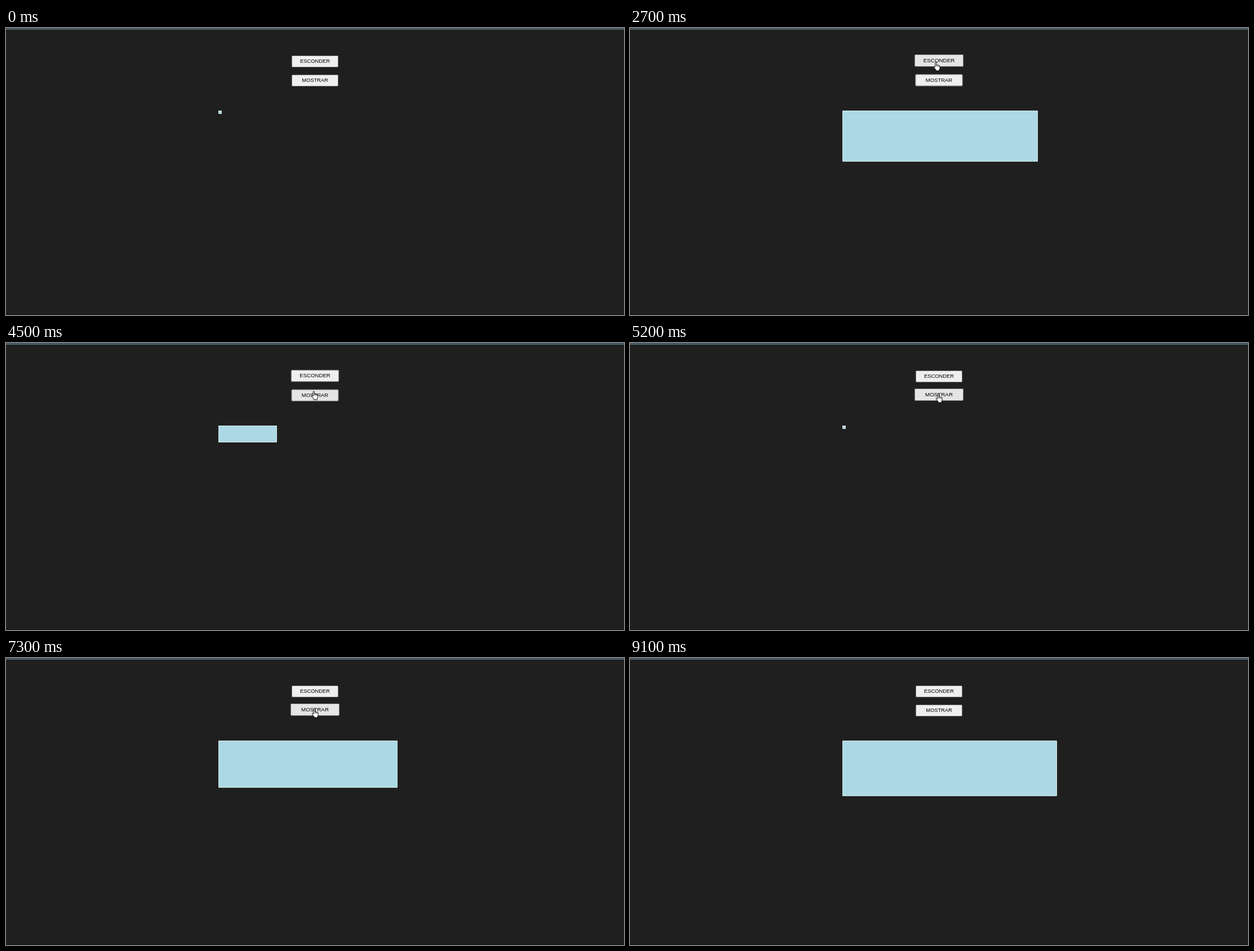
Recreate the animation shown at these times as an HTML page. Size 1097 by 511 pixels, loop 9400 ms.

```html
<!DOCTYPE html>
<html lang="pt">
<head>
<meta charset="utf-8">
<title>Esconder e mostrar</title>
<style>
  html, body { margin: 0; width: 100%; height: 100%; overflow: hidden; background: #1f1f1f; }
  body { position: relative; }
  body > * { position: absolute; box-sizing: border-box; }
  .bar { left: 0; top: 0; width: 100%; height: 3px; background: #42505a; border-bottom: 1px solid #5b7480; }
  .foot { left: 0; bottom: 0; width: 100%; height: 1px; background: #151515; }
  .btn {
    left: 507px; width: 83px; height: 21px;
    border: 1px solid #767676; border-radius: 2px; background: #efefef; color: #000;
    font: 9.333px/19px "Liberation Sans", Arial, sans-serif; text-align: center;
  }
  #hide { top: 49px; }
  #show { top: 83px; }
  #box { left: 376.5px; top: 146.8px; background: #add8e6; border: 1px dotted #f5f5dc; border-radius: 1px; }
  #cursor { left: 0; top: 0; overflow: visible; }
  #cursor path { fill: #fff; stroke: #000; stroke-linejoin: round; }
  #cursor .knuckles { fill: none; stroke-width: .7; }
</style>
</head>
<body>
<div class="bar"></div>
<div class="foot"></div>
<div class="btn" id="hide">ESCONDER</div>
<div class="btn" id="show">MOSTRAR</div>
<div id="box"></div>
<svg id="cursor" width="14" height="18">
  <path id="arrow" d="M0 0V12L2.8 9.4L4.7 13.7L6.6 12.9L4.7 8.7H8.6Z"/>
  <g id="hand">
    <path d="M-1.2 1.2Q-1.2 0 0 0T1.2 1.2V5Q2.3 4.3 3.3 5.3Q4.5 4.8 5.3 5.8Q7 5.5 7.1 7.3V10.5Q7 12 6 13.4V15H0V13.6Q-2 11.2 -3.6 8.7Q-4 7.2 -2.6 7.3L-1.2 8.6Z"/>
    <path class="knuckles" d="M1.2 5V8M3.3 5.5V8M5.3 6V8"/>
  </g>
</svg>
<script>
const LOOP = 9400, STEP = 100;

// Each click toggles the box, which then swings open or shut
const RUNS = [
  { id: "show", start: 1025, end: 3105 },
  { id: "hide", start: 3177, end: 5187 },
  { id: "show", start: 5805, end: 7850 }
];

const VISITS = [
  { id: "show", enter: 690, leave: 2490 },
  { id: "hide", enter: 2560, leave: 4390 },
  { id: "show", enter: 4480, leave: 7990 }
];

// Pointer stops
const STOPS = [
  { t: 200, x: 12, y: 0 },
  { t: 750, x: 539, y: 94 }, { t: 2400, x: 540, y: 94 },
  { t: 2650, x: 543, y: 61 }, { t: 4250, x: 543, y: 61 },
  { t: 4550, x: 547, y: 91 }, { t: 7900, x: 547, y: 91 },
  { t: 8100, x: 98, y: 13 }, { t: 8600, x: 672, y: 264 }, { t: 9000, x: 19, y: 0 }
];

const el = id => document.getElementById(id);
const clamp = v => Math.max(0, Math.min(1, v));
const swing = u => (1 - Math.cos(Math.PI * clamp(u))) / 2;
const easeOut = u => 1 - (1 - clamp(u)) ** 2;
const isOver = (v, t) => t >= v.enter && t < v.leave;

// Quick rise on enter, slower fall on leave
const lift = (v, t) => easeOut((t - v.enter) / 140) - easeOut((t - v.leave) / 500);

function openness(t) {
  return RUNS.reduce((sum, { id, start, end }) =>
    sum + (id === "show" ? 1 : -1) * swing((t - start) / (end - start)), 0);
}

function pointer(t) {
  const i = Math.max(1, STOPS.findIndex(s => s.t >= t));
  const a = STOPS[i - 1], b = STOPS[i], u = clamp((t - a.t) / (b.t - a.t));
  return { x: a.x + (b.x - a.x) * u, y: a.y + (b.y - a.y) * u };
}

function drawButton(id, t) {
  const visits = VISITS.filter(v => v.id === id);
  const pressed = RUNS.some(r => r.id === id && t >= r.start - 110 && t < r.start - 10);
  const hot = visits.some(v => isOver(v, t));
  const k = Math.max(...visits.map(v => lift(v, t)));
  const style = el(id).style;
  style.background = pressed ? "#f5f5f5" : hot ? "#e5e5e5" : "#efefef";
  style.transform = k ? `translateY(${-1.6 * k}px) scale(${1 + .05 * k})` : "none";
}

function drawCursor(t) {
  const { x, y } = pointer(t), hand = VISITS.some(v => isOver(v, t));
  el("cursor").style.display = t >= 200 && t < 9100 ? "block" : "none";
  el("cursor").style.transform = `translate(${x}px, ${y}px)`;
  el("hand").style.display = hand ? "inline" : "none";
  el("arrow").style.display = hand ? "none" : "inline";
}

function tick() {
  const t = Math.floor((performance.now() + 1) % LOOP / STEP) * STEP;
  // The box ends the loop open, yet the loop begins with it shut
  const open = openness(t);
  el("box").style.width = 6.5 + 374.5 * open + "px";
  el("box").style.height = 6 + 93.5 * open + "px";
  drawButton("hide", t);
  drawButton("show", t);
  drawCursor(t);
  requestAnimationFrame(tick);
}
tick();
</script>
</body>
</html>
```
